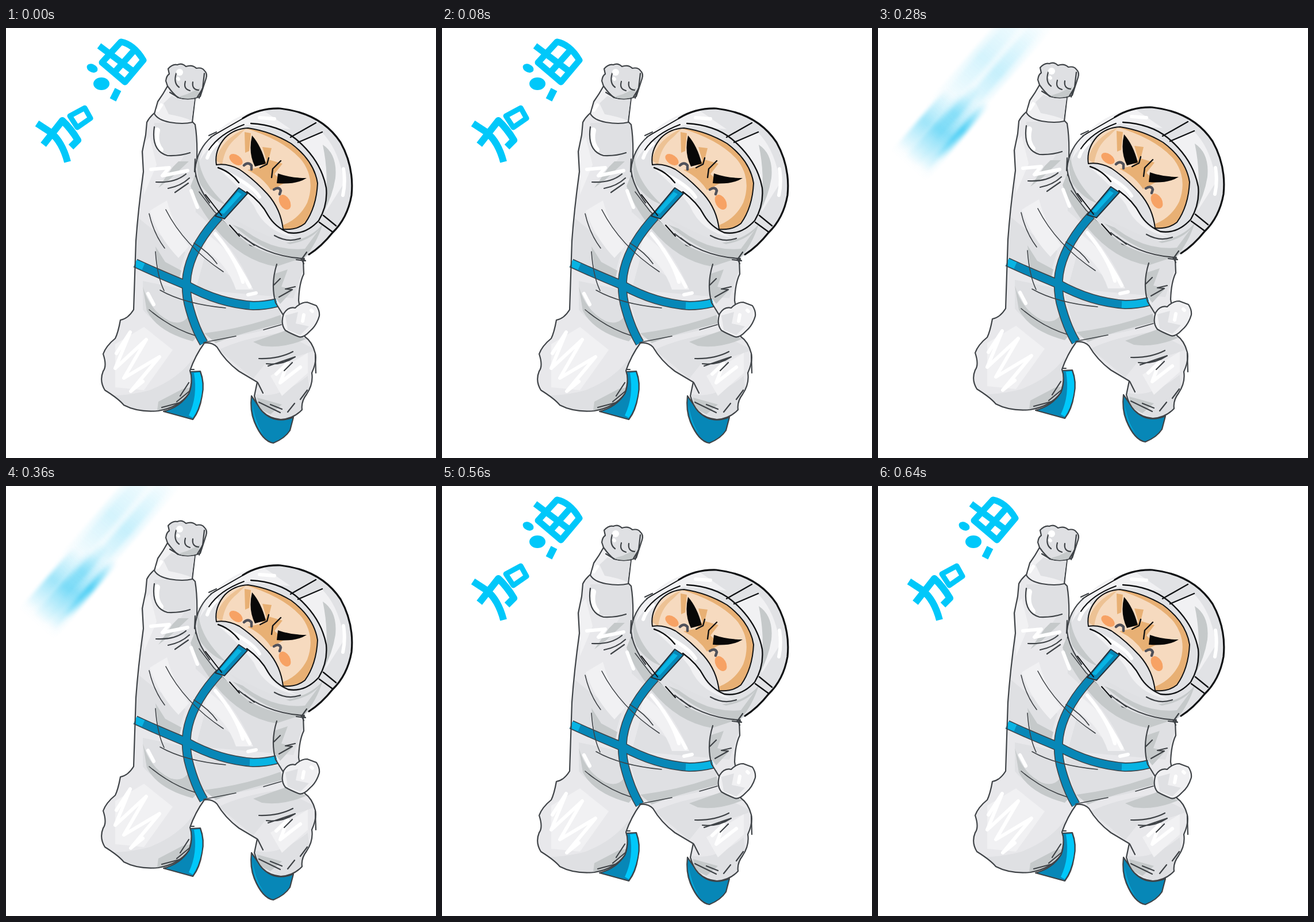
An HTML page that plays this animation: 748x748 px, repeating every 700 ms.

```html
<!DOCTYPE html>
<html lang="zh">
<head>
<meta charset="utf-8">
<title>加油</title>
<style>
html, body { margin: 0; width: 100%; height: 100%; overflow: hidden; background: #fff; }
svg { display: block; width: 100vw; height: 100vh; fill: none; stroke-linecap: round; stroke-linejoin: round; }
.ink { stroke: #3f4347; stroke-width: 2.2; }
.bold { stroke: #101214; stroke-width: 2.4; }
.light { fill: #f1f1f3; }
.mid { fill: #dfe0e3; }
.shade { fill: #c5c9ca; }
.shine { stroke: #fff; stroke-width: 6; }
.edge { stroke: #3f4347; stroke-width: 16; stroke-linecap: butt; }
.blue { stroke: #0787b7; stroke-width: 13; stroke-linecap: butt; }
.sky { stroke: #08b4e3; stroke-width: 12; stroke-linecap: butt; }
.word { stroke: #00c8fa; stroke-width: 12; stroke-linecap: butt; }
</style>
</head>
<body>
<svg viewBox="0 0 748 748">
<defs>
  <path id="suit" d="M258 148Q249 156 245 164L243 186L237 215L239 250Q230 315 226 370L222 490Q212 506 199 508Q195 530 190 540Q174 553 169 567Q176 588 169 597Q162 614 172 630Q196 645 205 656Q230 669 265 666Q301 660 318 636Q326 612 320 596Q329 570 345 548Q358 546 367 555Q381 579 405 597L437 616L432 640Q437 658 446 667Q458 679 478 681Q500 680 515 664Q513 650 523 637Q535 619 532 600Q541 580 538 566Q533 546 520 537L509 474Q510 444 518 428L517 402L425 378L330 258Q335 205 329 168L324 163Q290 169 258 148Z"/>
  <path id="hood" d="M360 188Q402 143 468 140Q541 145 580 196Q605 237 602 285Q597 327 570 355Q547 384 519 400Q470 403 422 376Q389 350 361 315Q329 279 329 245Q335 210 360 188Z"/>
  <path id="face" d="M366 238Q362 213 381 191Q397 175 421 174Q461 180 496 201Q536 231 542 270Q540 312 520 340Q505 352 482 350Q478 315 455 289Q430 262 406 246Q385 235 366 238Z"/>
  <path id="tape" d="M225 409Q264 427 315 448Q371 479 430 483Q450 483 471 478M411 282Q386 311 362 338Q322 385 315 430Q311 460 320 490Q330 525 344 548"/>
  <clipPath id="inSuit"><use href="#suit"/></clipPath>
  <clipPath id="inHood"><use href="#hood"/></clipPath>
  <clipPath id="inFace"><use href="#face"/></clipPath>
  <linearGradient id="streak">
    <stop stop-color="#00baf0" stop-opacity="0"/>
    <stop offset=".5" stop-color="#00baf0"/>
    <stop offset="1" stop-color="#00baf0" stop-opacity="0"/>
  </linearGradient>
</defs>

<g id="word" class="word" role="img" aria-label="加油">
  <path d="M65 203L98 161Q113 175 125 195L113 207M54 166L77 181Q98 198 107 233"/>
  <path d="M111 153L137 139L147 157L124 173Z" stroke-width="9"/>
  <path d="M167 60L200 24Q222 28 239 56L207 94ZM162 31L226 79M188 78L221 41" stroke-width="11"/>
  <path d="M186 125L195 107"/>
  <g fill="#00c8fa" stroke="none">
    <ellipse cx="150" cy="70" rx="10" ry="7" transform="rotate(25 150 70)"/>
    <ellipse cx="166" cy="97" rx="14" ry="11"/>
  </g>
</g>
<g id="streaks" transform="translate(107 177) rotate(-49)" fill="url(#streak)"></g>

<g id="hero">
  <!-- boots -->
  <g class="ink" fill="#0787b7">
    <path d="M319 598L338 597Q346 618 341 640Q337 666 325 681L274 667Q304 659 318 636Q326 618 319 598Z"/>
    <path d="M427 640Q424 666 432 685Q446 719 465 722Q485 714 494 700L500 677Q468 690 446 667Z"/>
  </g>
  <path fill="#00c8fa" d="M327 600L337 599Q344 618 340 640Q335 664 325 678L318 674Q334 640 327 600Z"/>
  <path fill="#08b4e3" d="M429 655Q431 690 449 708Q434 690 429 655Z"/>

  <!-- suit -->
  <use href="#suit" fill="#e8e8eb"/>
  <g clip-path="url(#inSuit)">
    <g class="mid">
      <path d="M258 165L330 165L330 262L272 262Q300 240 310 222Q262 225 258 190Z"/>
      <path d="M230 330Q265 360 312 390L300 430L222 400Z"/>
      <path d="M330 260Q390 360 520 410L500 470L330 455L345 400Q400 440 430 455Q400 380 330 320Z"/>
      <path d="M238 440L310 455L325 530Q260 520 238 490Z"/>
      <path d="M325 465Q390 490 480 488L470 520Q400 540 345 540Z"/>
      <path d="M165 640Q215 640 250 630Q300 610 325 575L330 640L270 670L200 660Z"/>
      <path d="M370 560Q410 540 480 530L540 560Q500 575 450 585L430 610Z"/>
      <path d="M430 635Q470 650 525 605L530 650L500 690L430 660Z"/>
    </g>
    <g class="light">
      <path d="M240 200L250 190L262 238L240 290Z"/>
      <path d="M250 318Q266 365 300 400L318 380Q290 340 280 300Z"/>
      <path d="M352 360Q400 395 430 455L400 455Q385 410 345 385Z"/>
      <path d="M190 550L240 520L290 560L240 630L190 625Z"/>
      <path d="M460 605L525 565L525 600L480 640Z"/>
    </g>
    <g class="shade">
      <path d="M321 275L329 255Q349 300 391 349Q430 385 518 399L470 415Q410 405 365 350Q333 310 321 275Z"/>
      <path d="M238 450Q250 492 285 510Q307 518 318 500L336 532L325 545Q264 529 245 492Z"/>
      <path d="M345 531Q415 522 478 499L480 514Q410 530 365 548Z"/>
      <path d="M430 546L490 525L522 541Q482 558 445 553Z"/>
      <path d="M300 232L318 232L285 263L265 278L290 242Z"/>
      <path d="M466 428L490 420L479 450L500 455L477 480L466 465Z"/>
      <path d="M265 650L307 628L322 625Q303 662 263 665Z"/>
      <path d="M437 643L480 655L460 672L440 662Z"/>
      <path d="M260 380L277 407L305 422L301 438L266 425Z"/>
    </g>
    <g class="shine">
      <path d="M263 178Q258 199 269 212" stroke-width="10"/>
      <path d="M252 246L284 243L272 257L316 248"/>
      <path d="M322 283L333 312M364 358Q400 400 412 442M385 385Q408 420 424 450M421 464L435 461"/>
      <path d="M192 566L216 529L190 592L244 542L205 609L267 572L217 632L238 615"/>
      <path d="M247 462L257 481M470 602L490 583L477 617L512 590"/>
    </g>
  </g>

  <!-- belt and placket -->
  <use href="#tape" class="edge"/>
  <use href="#tape" class="blue"/>
  <path class="sky" d="M225 409L239 415M424 483Q449 484 471 478M402 292L371 328"/>

  <!-- suit lines -->
  <g class="ink">
    <use href="#suit"/>
    <path d="M258 172Q252 214 281 222Q302 223 320 217M261 268Q294 270 313 254M282 279Q304 275 319 261M294 286L317 270"/>
    <path d="M249 323Q257 358 276 383M278 316Q310 379 378 424M336 285L362 319L384 340M327 374Q354 391 367 410" stroke-width="1.6"/>
    <path d="M260 389Q263 432 275 457M268 456Q310 480 382 487M249 490Q287 522 329 535M344 547L400 536M448 525L479 516" stroke-width="1.6"/>
    <path d="M440 575Q474 576 499 563M453 584Q480 587 503 572L456 588M484 596L498 582M438 617L447 635M440 651L477 669M460 655L480 663M524 630L512 646M502 653L490 668"/>
    <path d="M297 650L320 631M303 640L318 617M271 660L305 651M321 594L327 594M538 567L539 600"/>
    <path d="M471 411Q460 446 469 478L482 499M475 468L498 455L486 454L503 450M477 436L466 447M505 403L521 405L511 396L518 410"/>
  </g>

  <!-- raised fist -->
  <g class="ink">
    <path fill="#f0f0f2" d="M281 101Q274 114 264 128L258 149Q264 160 285 164Q308 168 324 164L329 121Z"/>
    <path fill="#dfe0e3" d="M281 101L278 92Q279 83 284 80L282 71Q290 62 298 64Q306 60 313 67Q324 63 331 70Q341 68 345 74Q351 79 348 88L338 119Q318 127 299 121Q291 115 281 101Z"/>
  </g>
  <path class="mid" d="M288 118Q306 127 328 124L323 161Q306 154 283 150L274 131Z"/>
  <path class="shade" d="M299 120L315 115L338 104L333 120Q317 126 299 120Z"/>
  <path class="ink" d="M296 79Q291 96 301 103M312 93Q308 106 320 109M325 94Q323 107 335 108M345 79L342 105L333 120M341 106L336 122M285 112L300 121"/>
  <path class="shine" d="M264 143L270 134M299 88L300 89"/>
  <circle cx="302" cy="77" r="6" fill="#fff"/>

  <!-- lowered fist -->
  <path class="ink" fill="#f0f0f2" style="fill:#f0f0f2" d="M483 497Q491 484 503 487Q513 477 524 477L540 483Q546 492 545 501Q540 518 529 527Q517 540 509 537Q494 531 486 526Q477 515 483 497Z"/>
  <path class="mid" d="M486 500L508 494L504 514L527 519L512 534L490 525Z"/>
  <path class="shine" d="M516 510L518 499M531 491L533 493"/>

  <!-- hood -->
  <use href="#hood" fill="#e1e2e5"/>
  <g clip-path="url(#inHood)">
    <g class="light">
      <path d="M350 188Q395 145 450 145L495 176L420 169Q360 190 337 231Z"/>
      <path d="M512 197L549 181Q580 212 588 270L556 320Q568 265 512 197Z"/>
      <path d="M369 245Q424 263 451 320Q464 350 490 357L505 365Q450 355 431 309Q410 280 369 245Z"/>
    </g>
    <g class="shade">
      <path d="M551 203Q577 220 573 261Q568 293 552 321Q564 265 551 203Z"/>
      <path d="M335 222Q336 264 382 307Q358 300 338 272Q329 247 335 222Z"/>
      <path d="M394 342Q444 363 486 374Q530 367 551 341Q540 376 519 400Q457 399 394 342Z"/>
    </g>
    <path class="mid" d="M387 327Q446 361 494 376Q530 369 545 350L520 384Q450 391 387 327Z"/>
    <path class="shine" d="M441 156L467 158M587 245Q591 269 586 291M384 252Q428 273 441 294M350 226Q355 211 367 201"/>
  </g>

  <!-- placket top over the collar -->
  <path d="M405 278L420 288L380 332L364 327Z" fill="#0787b7" stroke="#25313a" stroke-width="2"/>
  <path d="M403 285L410 289L379 323L372 321Z" fill="#08b4e3"/>

  <!-- face -->
  <use href="#face" fill="#f6dabf"/>
  <g clip-path="url(#inFace)" fill="#e8b074">
    <path d="M415 174Q485 195 515 231Q539 264 524 304Q510 332 482 343L483 354L528 342L552 290L537 220L480 180Z"/>
    <path fill="#edc294" d="M365 230Q375 193 417 175L402 190Q380 207 376 238Z"/>
    <path d="M446 207L462 209L457 229L481 236L467 254L484 270L461 282Q446 259 420 247L442 242L453 231Z"/>
    <path d="M415 181L426 183L423 214L416 217Z"/>
  </g>
  <g fill="#f7a264">
    <ellipse cx="400" cy="229" rx="13" ry="8" transform="rotate(35 400 229)"/>
    <ellipse cx="485" cy="303" rx="9" ry="14" transform="rotate(-30 485 303)"/>
  </g>
  <path fill="#080808" d="M428 187Q444 205 452 236L433 241Q421 217 428 187ZM473 253Q495 261 523 261Q505 273 471 270Z"/>
  <path stroke="#50515a" stroke-width="4.5" d="M414 239Q421 232 427 239L427 246M466 281Q475 275 478 283L476 289"/>
  <g class="bold">
    <path d="M457 226L454 237L442 243M478 231L464 245L462 260"/>
    <use href="#face" stroke-width="2"/>
  </g>

  <!-- hood lines -->
  <g class="bold">
    <path stroke-width="3.2" d="M412 157Q441 139 477 140Q548 148 582 199Q606 242 601 291Q594 331 568 356Q549 380 527 394"/>
    <path d="M426 166Q475 169 504 193Q548 230 557 278Q560 308 544 335Q520 361 491 356Q468 346 456 326Q444 303 419 285M405 269Q390 250 369 243"/>
    <path d="M495 190L539 165M508 199L550 181M552 326L574 344M545 338L567 354"/>
    <path d="M347 290L375 326M389 343L406 362M415 365L432 378M356 190L364 185L411 158M353 212Q371 184 414 168" stroke-width="2"/>
  </g>
  <path class="ink" d="M359 188Q332 211 329 246Q331 273 354 304M329 228L328 250M405 358Q453 398 519 401M523 390L513 404M353 187L366 181M467 361Q490 374 512 366"/>
</g>
</svg>
<script>
const STEP = 140;
const lifts = [0, -6, -2, 2, 6];
const [hero, word, streaks] = ["hero", "word", "streaks"].map(id => document.getElementById(id));

// Each streak: start, offset across, length, thickness, opacity
streaks.innerHTML = [
  [-85, -40, 150, 80, .1], [-70, -38, 130, 22, .3], [-75, -15, 150, 26, .42],
  [-72, 10, 150, 22, .42], [-40, 25, 130, 13, .55], [-20, -8, 120, 18, .28],
  [10, -46, 270, 78, .09], [30, -36, 230, 24, .08], [20, 0, 240, 22, .14]
].map(([x, y, w, h, o]) =>
  `<rect x="${x}" y="${y}" width="${w}" height="${h}" opacity="${o}" style="filter:blur(3px)"/>`).join("");

function draw() {
  const pose = Math.floor(performance.now() / STEP) % lifts.length;
  hero.setAttribute("transform", `translate(0 ${lifts[pose]})`);
  word.style.display = pose === 1 || pose === 2 ? "none" : "";
  streaks.style.display = pose === 2 ? "" : "none";
  requestAnimationFrame(draw);
}
draw();
</script>
</body>
</html>
```
